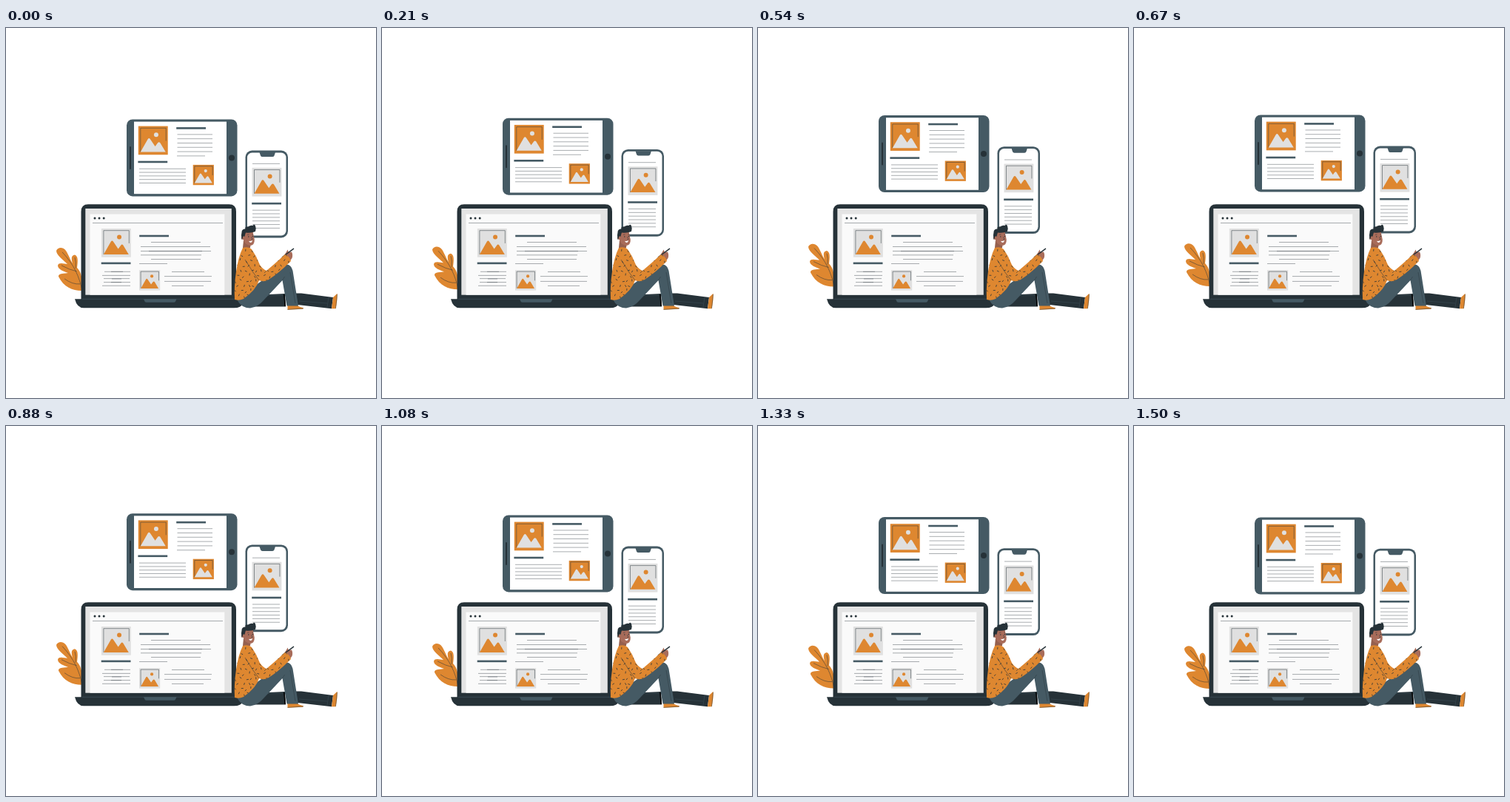
Write an HTML page that moves like this. It is 500x500 px and loops after 1.54 s.

```html
<!DOCTYPE html>
<html lang="en">
<head>
<meta charset="utf-8">
<title>Responsive devices</title>
<style>
  html, body { margin: 0; width: 100%; height: 100%; overflow: hidden; background: #fff; }
  svg { display: block; width: 100vw; height: 100vh; }
</style>
</head>
<body>
<svg viewBox="0 0 500 500">
  <defs>
    <path id="knit" d="M320 297Q328 295 332 299Q339 309 343 320Q347 326 352 328Q364 318 377 306Q383 308 385 315Q369 331 355 340Q349 344 342 341Q338 354 321 366Q315 369 309 367Q308 349 311 329Q314 309 320 297Z"/>
    <clipPath id="knitClip"><use href="#knit"/></clipPath>
  </defs>

  <g class="float">
    <path fill="#de8730" d="M102 355C90 355 78 350 71 336C70 331 80 332 84 331C78 329 70 326 70 321C71 316 79 319 83 319C77 313 68 307 68 301C71 295 78 297 81 301C85 307 87 314 90 318C88 312 88 307 93 306.5C98 308 97 317 96 324C100 328 104 335 104 356Z"/>
    <g fill="none" stroke="#263238" stroke-width=".5">
      <path d="M103 355C99 336 92 320 76 303M100 346Q90 347 79 339M95.500 329Q86 327 75 321M94 325Q95 316 93 310"/>
    </g>
  </g>

  <g class="float" id="tablet">
    <rect x="163" y="123.500" width="149.500" height="104" rx="8" fill="#455a64"/>
    <rect x="173" y="126.700" width="125" height="97.600" fill="#fff"/>
    <circle cx="305" cy="175.600" r="4" fill="#263238"/>
    <path d="M168 161V190" stroke="#263238" stroke-width="2" stroke-linecap="round"/>
  </g>

  <g class="float" id="phone">
    <rect x="323.500" y="165.700" width="57.500" height="117.800" rx="9" fill="#455a64"/>
    <rect x="326" y="168.600" width="52.500" height="112" rx="6.500" fill="#fff"/>
    <path d="M342.500 168H364L362.500 172.500Q362 174.200 360 174.200H346.500Q344.500 174.200 344 172.500Z" fill="#455a64"/>
  </g>

  <g id="laptop">
    <path d="M101.500 368V248Q101.500 238.300 111 238.300H301.500Q311 238.300 311 248V368Z" fill="#263238"/>
    <rect x="107.300" y="244" width="197.500" height="116.700" fill="#e4e4e4"/>
    <rect x="113.500" y="251.500" width="181.800" height="109.200" fill="#fafafa"/>
    <g fill="#263238">
      <circle cx="120" cy="257" r="1.500"/><circle cx="126" cy="257" r="1.500"/><circle cx="132.200" cy="257" r="1.500"/>
    </g>
    <path d="M93 366.300H320V372Q318 378.300 308 378.300H105Q96 378.300 93 366.300Z" fill="#263238"/>
    <path d="M103 366.300H310" stroke="#455a64" stroke-width=".6"/>
    <path d="M186 366.300H230.500L229 369.500Q228.500 370.800 226.500 370.800H190Q188 370.800 187.500 369.500Z" fill="#455a64"/>
  </g>

  <g id="man">
    <path d="M335 361L377 359L378 376.500H330ZM390 358.500L399 358.500L442 364L440 379.300L394 374Z" fill="#263238"/>
    <path d="M375.800 360L377.300 376" stroke="#000" stroke-width="1.500"/>
    <path d="M396 369L434 372M436 364L434 377M340 362L374 361" stroke="#455a64" stroke-width=".4" fill="none"/>
    <path d="M442 364L447.600 358.800Q448 368 445.500 379.300H440Z" fill="#de8730"/>
    <path d="M445.500 379L447.500 360" stroke="#263238" stroke-width=".5"/>
    <path d="M380.500 375H394Q396 377 402 378.300L401 379.700L380.500 380.800Z" fill="#de8730"/>
    <path d="M380.500 380.400L402 379" stroke="#263238" stroke-width=".5"/>
    <path d="M312 367Q318 378.500 330 378.500Q340 377.500 349 367L373.500 341L379.500 375.500H395L387.500 328Q385.500 320 379.500 319.500Q373 321 364 329L338 347Q326 361 312 367Z" fill="#455a64"/>
    <path d="M373.500 341L376.500 336M384 330L391 372" stroke="#263238" stroke-width=".4" fill="none"/>
    <path d="M321 287L331 290L330 297Q325 300 320 297Z" fill="#95604f"/>
    <path d="M321 275H333.500L335.800 286Q336 293 330.500 294Q324 294 321 287Z" fill="#a86c5a"/>
    <circle cx="320.600" cy="283.500" r="2.500" fill="#a86c5a"/>
    <path d="M318.500 286Q317.300 280 318.800 274Q320 271 323.500 271.500Q322.500 268 327 268.500Q331 266 333.500 267Q336 264.500 337 267.500Q338.500 271 337 275Q332 277.300 324 276.500Q323 279 322.500 282Q320 280 319.800 284Z" fill="#263238"/>
    <g fill="#263238"><circle cx="327.800" cy="282" r=".7"/><circle cx="333.500" cy="281.500" r=".7"/></g>
    <path d="M326 279.500L328.500 279M332.500 279L334 279.200M331.500 282L333 285.500L331.300 286" stroke="#263238" stroke-width=".5" fill="none"/>
    <path d="M328 287.700Q330.500 288.300 333 287Q332.500 290 330.500 290Q328.700 289.600 328 287.700Z" fill="#fff"/>
    <path d="M376 307L379 302.500L380.500 299.500L382 303L386 302.500Q388 307 386.500 311L383.500 315Q378 313 376 307Z" fill="#a86c5a"/>
    <path d="M373.500 309.500L388.500 298.300" stroke="#263238" stroke-width="1.500" stroke-linecap="round"/>
    <use href="#knit" fill="#de8730"/>
    <g clip-path="url(#knitClip)"><path id="flecks" fill="none" stroke="#263238" stroke-width=".8" stroke-linecap="round"/></g>
    <path d="M342 341L334.500 331L323 313M352 328L349 331" stroke="#263238" stroke-width=".5" fill="none"/>
  </g>
</svg>
<script>
const ORANGE = '#de8730', GREY = '#e0e0e0', SLATE = '#455a64';
const $ = id => document.getElementById(id);

function add(parent, tag, attrs) {
  const el = document.createElementNS('http://www.w3.org/2000/svg', tag);
  for (const k in attrs) el.setAttribute(k, attrs[k]);
  parent.appendChild(el);
}

function bar(g, x, y) {
  add(g, 'rect', { x, y, width: 39.8, height: 2.6, fill: SLATE });
}

// A row is [x1, x2, y]
function rows(g, list) {
  const d = list.map(([a, b, y]) => `M${a} ${y}H${b}`).join('');
  add(g, 'path', { d, stroke: '#263238', 'stroke-width': 0.4, fill: 'none' });
}

function column(x1, x2, y, step, n) {
  return Array.from({ length: n }, (_, i) => [x1, x2, y + i * step]);
}

// Framed landscape on a 40 by 38.5 grid
function picture(g, x, y, size, back, ink) {
  const s = size / 40;
  const p = document.createElementNS('http://www.w3.org/2000/svg', 'g');
  p.setAttribute('transform', `translate(${x} ${y}) scale(${s})`);
  g.appendChild(p);
  add(p, 'rect', { width: 40, height: 38.8, fill: back });
  add(p, 'path', { d: 'M3 35V2.700H37.500V20', fill: 'none', stroke: '#263238', 'stroke-width': 0.5 / s });
  add(p, 'circle', { cx: 24.2, cy: 11.6, r: 3, fill: ink });
  add(p, 'path', { d: 'M3 35L13 17.500Q14.500 15.500 16 17.500L22.800 27.500L26.500 22.500Q28 20.800 29.500 22.500L37 35Z', fill: ink });
}

const tablet = $('tablet'), phone = $('phone'), laptop = $('laptop');

picture(tablet, 178.8, 132.7, 39.9, ORANGE, GREY);
picture(tablet, 252.7, 185, 28.2, ORANGE, GREY);
bar(tablet, 230.2, 134.2);
bar(tablet, 178.4, 179.8);
rows(tablet, [...column(231.5, 279, 144, 5.8, 5), [231, 269, 173],
  ...column(180, 243, 190.4, 4.8, 5)]);

picture(phone, 332.5, 189, 39.9, GREY, ORANGE);
bar(phone, 332.2, 236);
rows(phone, [[333, 370, 183.5], ...column(333, 370, 246.3, 4.85, 6)]);

picture(laptop, 128.9, 271, 39.9, GREY, ORANGE);
picture(laptop, 180, 327.2, 28.2, GREY, ORANGE);
bar(laptop, 180.2, 279.7);
bar(laptop, 128.7, 316.6);
rows(laptop, [[117, 293, 263.5],
  [196, 263, 289.5], [182, 276, 295.5], [182, 277, 301.5], [193, 265, 301.5],
  [182, 264, 306.8], [196, 263, 312.5], [180, 218, 318.5],
  [133, 168, 329.3], [142, 158, 329.3], [130, 168, 334.4], [132, 167, 338.6],
  [143, 156, 339], [132, 168, 343.6], [142, 156, 343.6], [130, 168, 348.3],
  [224, 268, 329.5], [214, 278, 335.6], [214, 277, 342.4], [224, 267, 348.4]]);

// Scattered knit pattern
let flecks = '';
for (let r = 0; r < 10; r++) {
  for (let c = 0; c < 11; c++) {
    const k = r * 11 + c, a = k * 2.4;
    const x = 310 + c * 7.2 + (r % 2) * 3.6 + Math.sin(k * 5.1);
    const y = 301 + r * 6.8 + Math.cos(k * 3.7);
    flecks += `M${x.toFixed(1)} ${y.toFixed(1)}l${(2.2 * Math.cos(a)).toFixed(1)} ${(2.2 * Math.sin(a)).toFixed(1)}`;
  }
}
$('flecks').setAttribute('d', flecks);

const LOOP = 1540, LEAD = 70, RISE = 6.1;
const floats = document.querySelectorAll('.float');

function draw(ms) {
  const phase = (ms + LEAD) / LOOP * 2 * Math.PI;
  const dy = -RISE * (1 - Math.cos(phase)) / 2;
  floats.forEach(g => g.setAttribute('transform', `translate(0 ${dy.toFixed(3)})`));
}

const start = performance.now();
function tick() {
  draw((performance.now() - start) % LOOP);
  requestAnimationFrame(tick);
}
draw(0);
requestAnimationFrame(tick);
</script>
</body>
</html>
```
